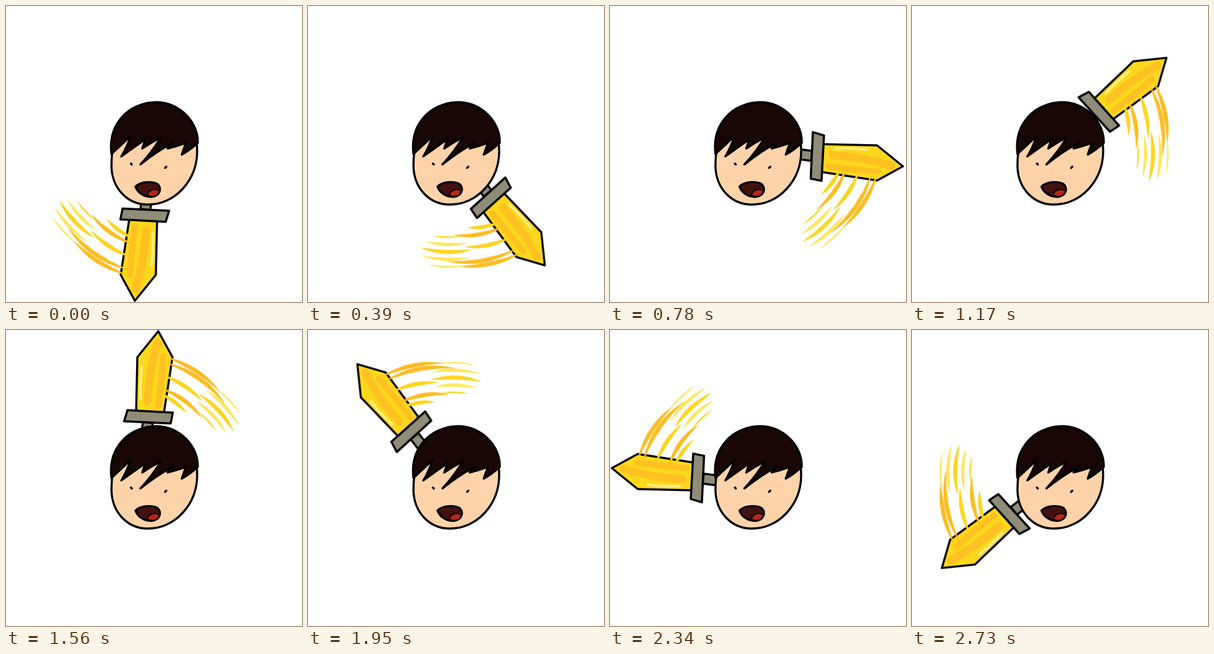
Write an HTML page that moves like this. It is 480x480 px and loops after 3.12 s.

```html
<!DOCTYPE html>
<html lang="en">
<head>
<meta charset="utf-8">
<title>Sword orbit</title>
<style>
  html, body { margin: 0; width: 100%; height: 100%; overflow: hidden; background: #fff; }
  svg { display: block; width: 100vw; height: 100vh; }
  .ink { stroke: #000; stroke-width: 3.4; stroke-linejoin: round; stroke-linecap: round; }
  .shade { fill: none; stroke: #ffc021; stroke-linecap: round; }
  .shine { stroke: #ffee82; }

  /* Held poses, each an eighth of a turn */
  #sword { transform-origin: 0 0; animation: orbit 3120ms step-end infinite; }
  @keyframes orbit {
    0%    { transform: translate(225px, 339px) rotate(0deg); }
    12.5% { transform: translate(297px, 311px) rotate(-45deg); }
    25%   { transform: translate(336px, 244px) rotate(-90deg); }
    37.5% { transform: translate(303px, 171px) rotate(-135deg); }
    50%   { transform: translate(231px, 141px) rotate(-180deg); }
    62.5% { transform: translate(167px, 165px) rotate(-225deg); }
    75%   { transform: translate(142px, 240px) rotate(-270deg); }
    87.5% { transform: translate(158px, 299px) rotate(-315deg); }
    100%  { transform: translate(225px, 339px) rotate(-360deg); }
  }
</style>
</head>
<body>
<svg viewBox="0 0 480 480">
  <g id="sword">
    <g transform="translate(-225 -339)">
      <path class="ink" fill="#8f8c78" d="M222 298L238 300L234 331L218 329Z"/>
      <path class="ink" fill="#fcd81c" d="M200 345L186 436L209 478L243 436L245 346Z"/>
      <path class="shade" stroke-width="10" d="M209 357Q204 395 201 437"/>
      <path class="shade" stroke-width="13" d="M227 364Q224 405 216 438L210 459"/>
      <path class="shade shine" stroke-width="4" d="M238 368Q239 392 236 420"/>
      <g id="trail"></g>
      <path class="ink" fill="#8f8c78" d="M189 328.500L264.500 332L259 350L185.500 346Z"/>
    </g>
  </g>

  <g id="head">
    <path class="ink" fill="#ffd3aa" d="M171 260C172 296 197 322 230 322C274 322 310 283 310 235C310 190 284 156 243 156C200 156 171 195 171 260Z"/>
    <path class="ink" fill="#180704" d="M171 240C165 192 198 156.500 243 156.500C284 156.500 312 190 311 222Q298 234 285 241Q288 232 292 222Q276 228 262 231L270 222Q244 236 218 257Q238 235 251 213Q236 221 221 231L226 216Q206 230 187 244Q196 229 202 211Z"/>
    <path class="ink" fill="none" d="M202.500 255.500l1.500 1.500M258 262.500l2-2"/>
    <path class="ink" fill="#43120f" d="M210 293C218 284 239 284 246 289C253 296 250 308 236 309.500C224 310 214 303 210 293Z"/>
    <path fill="#b9251d" stroke="#000" stroke-width="2" d="M229 307C231 298 241 295 249 300C248 306 242 309 236 309Z"/>
  </g>
</svg>
<script>
  const gold = '#fcd51f', amber = '#ffbc20', pale = '#ffe65c';
  const trail = document.getElementById('trail');

  // Point around the orbit's centre, in degrees behind the blade
  function orbitPoint(radius, degrees) {
    const angle = degrees * Math.PI / 180;
    return [232 - radius * Math.sin(angle), 237 + radius * Math.cos(angle)];
  }

  // A curved sliver, pointed at both ends, that drifts inwards
  function addStreak(radius, from, to, drift, width, colour) {
    const start = orbitPoint(radius, from);
    const end = orbitPoint(radius - drift, to);
    const bend = offset => {
      const middle = orbitPoint(radius - drift / 2 + offset, (from + to) / 2);
      return middle.map((m, k) => 2 * m - (start[k] + end[k]) / 2);
    };
    trail.innerHTML += `<path fill="${colour}" stroke="${colour}" stroke-linejoin="round"
      d="M${start}Q${bend(width / 2)} ${end}Q${bend(-width / 2)} ${start}Z"/>`;
  }

  // Thin wisps further back, fullest in the middle
  [gold, pale, gold, pale, pale].forEach((colour, i) => {
    const bell = Math.sin(i * Math.PI / 4);
    const reach = 8 + 6 * bell;
    addStreak(141 + 12 * i, 47 - reach, 47 + reach, 0, 2 + 4 * bell, colour);
  });

  // Broad streaks that touch the blade
  [gold, amber, gold, amber, amber].forEach((colour, i) => {
    const radius = 172 - 30 * Math.cos(i * Math.PI / 4);
    addStreak(radius, 11, 32 + 2 * i + 8 * (i % 2), 13, 6, colour);
  });
</script>
</body>
</html>
```
